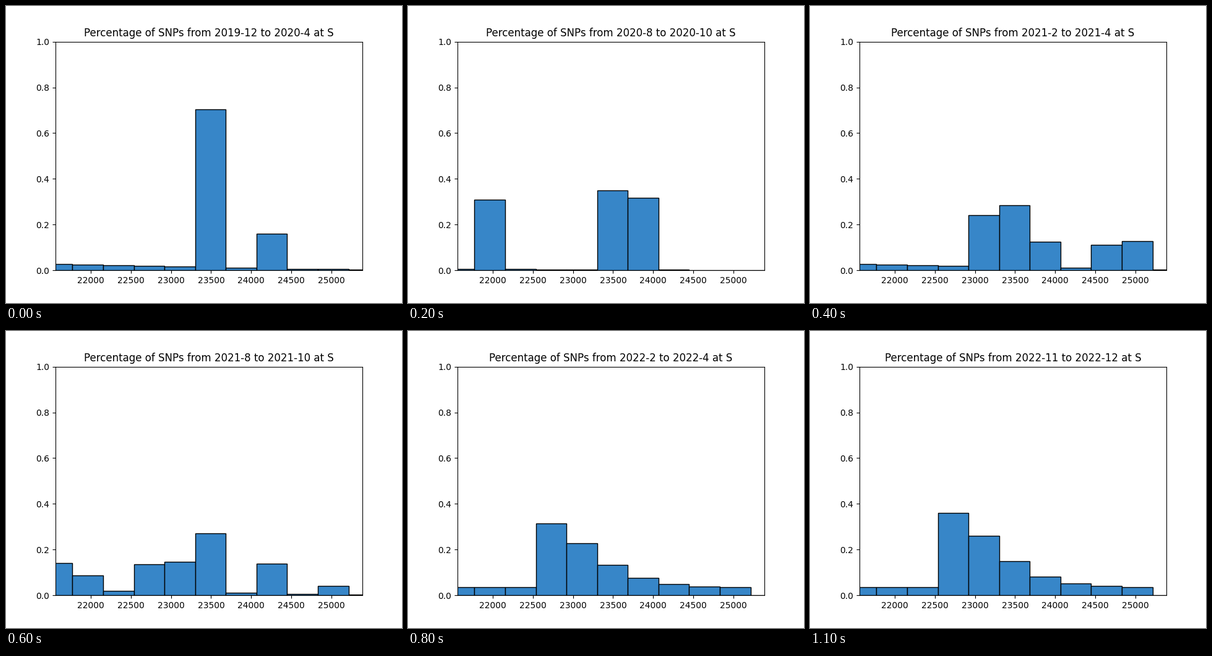
Animation, 640 px wide and 480 px high, one loop 1200 ms. Source, as a matplotlib script:

```python
import matplotlib.pyplot as plt
import numpy as np
from matplotlib.animation import FuncAnimation

GENE = (21563, 25384)
BIN = 382
FRAMES = 12
SETTLED = 8
bins = np.arange(11)

# Leading bins of each early wave: period -> {bin: share}
WAVES = {
    0: {5: .704, 7: .16},
    2: {1: .309, 5: .35, 6: .317},
    4: {4: .241, 5: .284, 6: .125, 8: .111, 9: .128},
    6: {0: .141, 1: .087, 3: .136, 4: .146, 5: .271, 7: .138, 9: .041},
}


def wave(peaks):
    """Give the leading bins their share and taper the rest to a sum of 1."""
    share = 1.0 * (len(bins) - bins)
    lead = list(peaks)
    share[lead] = 0
    share *= (1 - sum(peaks.values())) / share.sum()
    share[lead] = list(peaks.values())
    return share


def settled(i):
    """A flat floor with a growing peak at bin 3 that decays to the right."""
    peak = .28 + .015 * (i - SETTLED)
    tail = np.exp(-.37 * np.maximum(bins - 3, 0) ** 1.5)
    share = .035 + peak * np.where(bins < 3, 0, tail)
    share[-1] = 0
    return share


def shares(i):
    if i >= SETTLED:
        return settled(i)
    start = i - i % 2
    stop = start + 2
    after = wave(WAVES[stop]) if stop in WAVES else settled(stop)
    mix = (i - start) / 2
    return (1 - mix) * wave(WAVES[start]) + mix * after


def month(n):
    """Name the month n months after January 2020."""
    return f"{2020 + n // 12}-{n % 12 + 1}"


def title(i):
    first = 3 * i + 1 if i else -1
    last = min(3 * i + 3, 35)
    return f"Percentage of SNPs from {month(first)} to {month(last)} at S"


fig, ax = plt.subplots(figsize=(6.4, 4.8), dpi=100)
bars = ax.bar(BIN * (56 + bins), shares(0), width=BIN, align="edge",
              color="#3786c8", edgecolor="black", linewidth=1)
ax.set_xlim(*GENE)
ax.set_ylim(0, 1)
heading = ax.set_title(title(0))


def update(i):
    for bar, share in zip(bars, shares(i)):
        bar.set_height(share)
    heading.set_text(title(i))
    return [*bars, heading]


anim = FuncAnimation(fig, update, frames=FRAMES, interval=100,
                     repeat=True, repeat_delay=0, blit=False)
plt.show()
```
